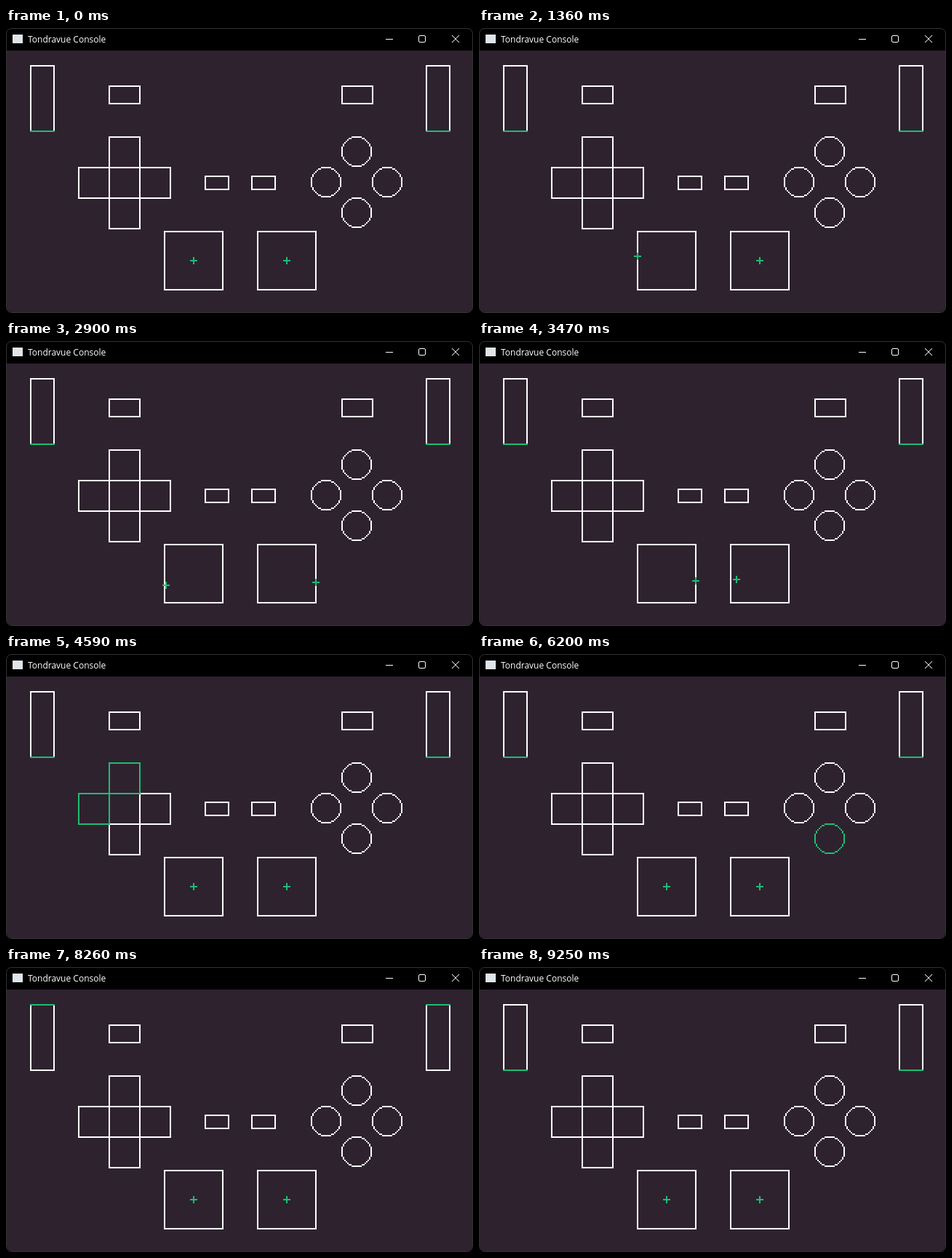
Animation, 642 px wide and 392 px high, one loop 9.72 s. Source, as an HTML page with a canvas:

```html
<!DOCTYPE html>
<html lang="en">
<head>
<meta charset="utf-8">
<title>Controller test</title>
<style>
  html, body { margin: 0; width: 100%; height: 100%; overflow: hidden; background: #000; }
  .window {
    position: absolute; left: 0; top: 0; width: 642px; height: 392px;
    box-sizing: border-box; border: 1px solid #333; border-radius: 8px;
    overflow: hidden; background: #000;
  }
  .icon { position: absolute; left: 8px; top: 8px; width: 14px; height: 12px; background: #dfe5e8; }
  .title {
    position: absolute; left: 29px; top: 0; line-height: 29px; white-space: nowrap;
    font-family: "Open Sans", "Noto Sans", sans-serif; font-size: 12px; color: #fff;
  }
  .controls { position: absolute; left: 0; top: 0; fill: none; stroke: #fff; }
  canvas {
    position: absolute; left: 0; top: 30px; width: 640px; height: 360px;
    image-rendering: pixelated;
  }
</style>
</head>
<body>
<div class="window">
  <div class="icon"></div>
  <div class="title">Tondravue Console</div>
  <svg class="controls" width="640" height="30">
    <path d="M521 14.5h10"/>
    <rect x="566.5" y="9.5" width="9" height="9" rx="1.5"/>
    <path d="M612 9l10 10m0 -10l-10 10"/>
  </svg>
  <canvas width="320" height="180"></canvas>
</div>
<script>
const LOOP = 9720, SAMPLE = 1000 / 30;
const BACK = '#2e222f', WHITE = '#ffffff', GREEN = '#1ebc73';
const ctx = document.querySelector('canvas').getContext('2d');

const clamp = (v, lo, hi) => Math.max(lo, Math.min(hi, v));
const ramp = (t, from, to) => clamp((t - from) / (to - from), 0, 1);
const radians = degrees => degrees * Math.PI / 180;

function box(x, y, w, h) {
  ctx.fillRect(x, y, w, 1);
  ctx.fillRect(x, y + h - 1, w, 1);
  ctx.fillRect(x, y, 1, h);
  ctx.fillRect(x + w - 1, y, 1, h);
}

function ring(cx, cy, r = 10) {
  for (let a = 0; a <= r * Math.SQRT1_2; a++) {
    const b = Math.round(Math.sqrt(r * r - a * a));
    for (const [dx, dy] of [[a, b], [b, a]])
      for (const sx of [-1, 1])
        for (const sy of [-1, 1]) ctx.fillRect(cx + sx * dx, cy + sy * dy, 1, 1);
  }
}

// Four buttons around a centre, pressed in a circle so that neighbours overlap by one step.
function roll({ cx, cy, first, turn, shape, start, hold, step, steps }) {
  return [0, 1, 2, 3].map(i => {
    const angle = radians(first + turn * i);
    const x = cx + Math.round(21 * Math.cos(angle));
    const y = cy + Math.round(21 * Math.sin(angle));
    return {
      draw: () => shape(x, y),
      isDown(t) {
        const phase = Math.max(0, 1 + (t - start - hold) / step);
        return t >= start && phase < steps && (phase + 9 - 2 * i) % 8 < 3;
      }
    };
  });
}

const tap = (x, y, w, h, start, length) => ({
  draw: () => box(x, y, w, h),
  isDown: t => t >= start && t < start + length
});

const buttons = [
  ...roll({
    cx: 70, cy: 80, first: -90, turn: -90, shape: (x, y) => box(x, y, 22, 22),
    start: 4460, hold: 130, step: 120, steps: 8
  }),
  ...roll({
    cx: 240, cy: 90, first: 180, turn: 90, shape: (x, y) => ring(x, y),
    start: 5490, hold: 230, step: 90, steps: 9
  }),
  tap(136, 86, 17, 10, 6580, 170),
  tap(168, 86, 17, 10, 6750, 190),
  tap(70, 24, 22, 13, 7070, 220),
  tap(230, 24, 22, 13, 7270, 200)
];

// Each stick is pushed out at an angle, circled at constant speed, then let go.
const sticks = [
  { cx: 128, reach: 20.3, lean: 0, angle: -143, speed: -0.25,
    push: 540, pushed: 1150, turn: 1218, release: 4080 },
  { cx: 192, reach: 18.8, lean: 2.3, angle: -78, speed: 0.262,
    push: 2360, pushed: 2540, turn: 2540, release: 4140 }
];

function drawStick(stick, t) {
  const { cx, reach, lean, push, pushed, turn, release } = stick, cy = 144;
  const angle = radians(stick.angle + stick.speed * Math.max(0, t - turn));
  const radius = (reach + lean * Math.cos(angle))
    * ramp(t, push, pushed) * (1 - ramp(t, release, 4280));
  const x = cx + clamp(Math.round(radius * Math.cos(angle)), -20, 20);
  const y = cy + clamp(Math.round(radius * Math.sin(angle)), -20, 20);
  ctx.fillStyle = WHITE;
  box(cx - 20, cy - 20, 41, 41);
  ctx.fillStyle = GREEN;
  ctx.fillRect(x - 2, y, 5, 1);
  ctx.fillRect(x, y - 2, 1, 5);
}

function drawTrigger(x, level) {
  ctx.fillStyle = WHITE;
  box(x, 10, 17, 46);
  ctx.fillStyle = GREEN;
  ctx.fillRect(x, 55 - Math.round(45 * level), 17, 1);
}

function draw(t) {
  const sampled = Math.floor((t + 5) / SAMPLE) * SAMPLE;
  ctx.fillStyle = BACK;
  ctx.fillRect(0, 0, 320, 180);
  ctx.fillStyle = WHITE;
  buttons.forEach(button => button.draw());
  ctx.fillStyle = GREEN;
  buttons.filter(button => button.isDown(t)).forEach(button => button.draw());
  sticks.forEach(stick => drawStick(stick, sampled));
  const level = ramp(sampled, 7640, 8230) - ramp(sampled, 8760, 9220);
  drawTrigger(16, level);
  drawTrigger(288, level);
}

function tick() {
  draw(performance.now() % LOOP);
  requestAnimationFrame(tick);
}
tick();
</script>
</body>
</html>
```
